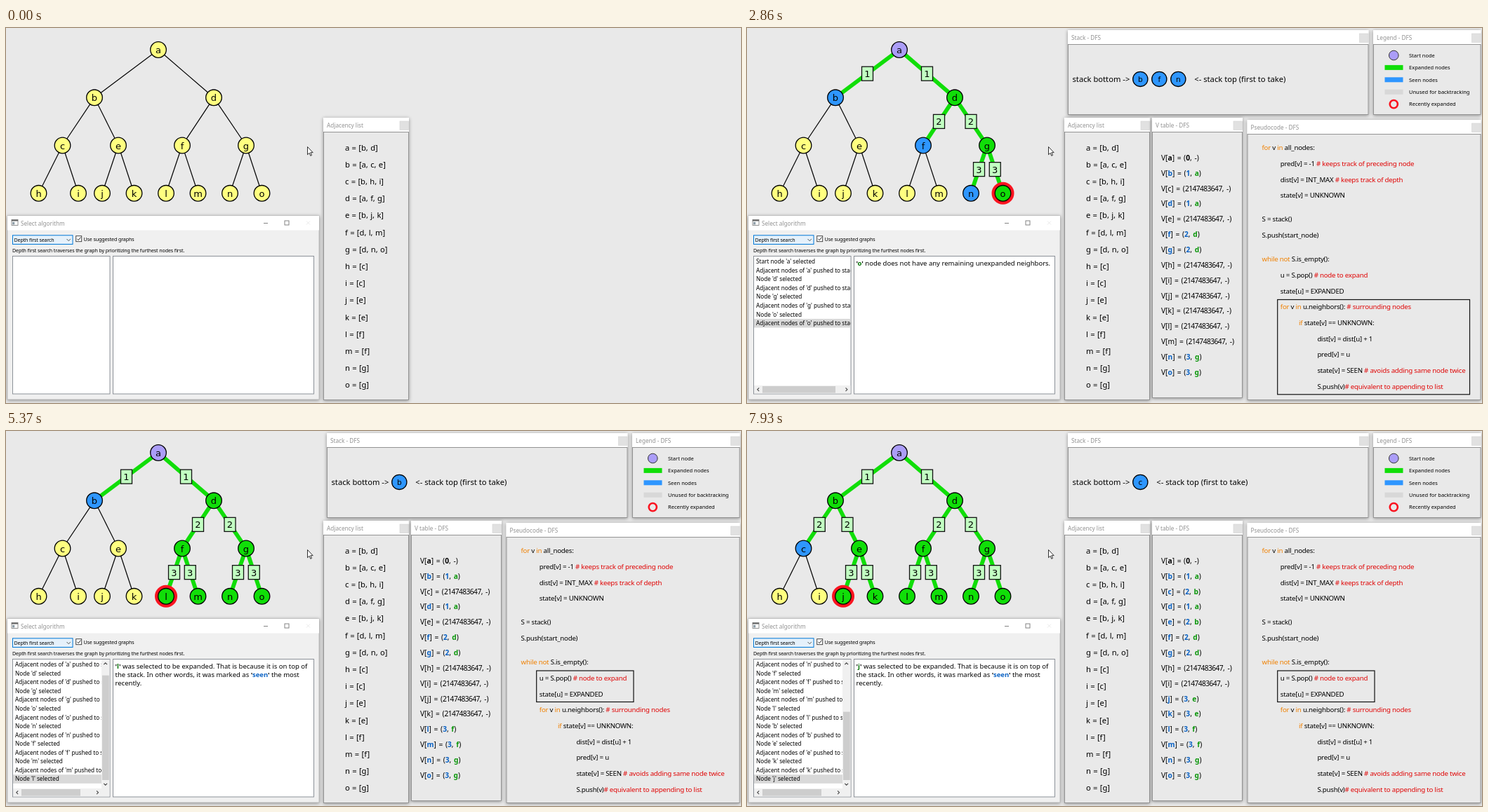
Animation, 1047 px wide and 535 px high, one loop 8 s. Source, as an HTML page:

```html
<!DOCTYPE html>
<html lang="en">
<head>
<meta charset="utf-8">
<title>Depth first search</title>
<style>
html, body { margin: 0; width: 100%; height: 100%; overflow: hidden; background: #e9e9e9; }
svg { display: block; }
text { font-family: "Noto Sans", sans-serif; fill: #000; white-space: pre; }
.title { font-size: 8.2px; fill: #929292; }
.ui { font-size: 7.1px; letter-spacing: -.12px; }
.log { font-size: 8.2px; }
.body { font-size: 9.5px; }
.adj { font-size: 11.2px; word-spacing: .4px; }
.row { font-size: 10.2px; word-spacing: 1px; }
.digits { letter-spacing: -.55px; }
.code { font-size: 9.7px; letter-spacing: -.23px; }
.legend { font-size: 7.5px; }
.stack { font-size: 11.2px; }
.node, .item { font-family: "DejaVu Sans", sans-serif; text-anchor: middle; }
.node { font-size: 13px; }
.item { font-size: 10.5px; }
.b { font-weight: bold; }
.blue { font-weight: bold; fill: #0a62c4; }
.green { font-weight: bold; fill: #0a960a; }
.dark { font-weight: bold; fill: #007000; }
.key { fill: #f08000; }
.note { fill: #e00606; }
.win { filter: drop-shadow(0 1px 2.5px rgba(0, 0, 0, .4)); }
</style>
</head>
<body>
<svg id="stage" width="1047" height="535" viewBox="0 0 1047 535">
  <g id="graph"></g>
  <g id="base"></g>
  <g id="panel"></g>
  <g id="extra">
    <g id="frames"></g>
    <g id="live"></g>
    <g id="focus"></g>
  </g>
  <path d="M429.5 169.5v11.2l2.6-2.4 1.7 4 1.7-.8-1.7-3.8h3.4z" fill="#fff" stroke="#000" stroke-width=".8"/>
</svg>
<script>
const LOOP = 8000;
const YELLOW = '#ffff80', PURPLE = '#ab9df8', GREEN = '#10de08', BLUE = '#2e96ff', RED = '#fa1420', ORANGE = '#ffb108';
const names = [...'abcdefghijklmno'];
const kids = { a: 'bd', b: 'ce', c: 'hi', d: 'fg', e: 'jk', f: 'lm', g: 'no' };
const levels = [31, 99.3, 167.5, 235.8];
const xs = [217, 126, 80.5, 296, 160, 251, 342, 46.5, 103, 137, 182.5, 228, 273.5, 319, 364.5];
const parent = {}, depth = { a: 0 }, pos = {};
const walk = u => [...(kids[u] || '')].forEach(v => {
  parent[v] = u;
  depth[v] = depth[u] + 1;
  walk(v);
});
walk('a');
names.forEach((n, i) => pos[n] = [xs[i], levels[depth[n]]]);

const $ = id => document.getElementById(id);
const text = (x, y, cls, s) => `<text x="${x}" y="${y}" class="${cls}">${s}</text>`;
const span = (cls, s) => `<tspan class="${cls}">${s}</tspan>`;
const rect = (x, y, w, h, fill, stroke = 'none', sw = 1) =>
  `<rect x="${x}" y="${y}" width="${w}" height="${h}" fill="${fill}" stroke="${stroke}" stroke-width="${sw}"/>`;
const circle = (x, y, r, fill, stroke = 'none', sw = 1.4) =>
  `<circle cx="${x}" cy="${y}" r="${r}" fill="${fill}" stroke="${stroke}" stroke-width="${sw}"/>`;
const path = (d, stroke, sw) => `<path d="${d}" fill="none" stroke="${stroke}" stroke-width="${sw}"/>`;
const quote = (cls, n) => `${span('b', "'")}${span(cls, n)}${span('b', "'")}`;

// Run the search once and keep a snapshot of every step
const steps = [];
const stack = ['a'], seen = new Set('a'), done = new Set();
function snap(log, recent, fresh, lines) {
  steps.push({ log, recent, fresh, lines, stack: [...stack], seen: new Set(seen), done: new Set(done) });
}
while (stack.length) {
  const u = stack.pop(), next = [...(kids[u] || '')];
  done.add(u);
  snap(u == 'a' ? "Start node 'a' selected" : `Node '${u}' selected`, u, [], u == 'a'
    ? [`${quote('dark', u)} was selected as the start node.`]
    : [`${quote('dark', u)} was selected to be expanded. That is because it is on top of`,
       `the stack. In other words, it was marked as ${quote('blue', 'seen')} the most`, 'recently.']);
  next.forEach(v => { stack.push(v); seen.add(v); });
  snap(`Adjacent nodes of '${u}' pushed to stack`, u, next, next.length
    ? [`Adjacent nodes of ${quote('dark', u)} were pushed to the stack and`,
       `marked as ${quote('blue', 'seen')}: ${next.map(v => quote('blue', v)).join(', ')}.`]
    : [`${quote('dark', u)} node does not have any remaining unexpanded neighbors.`]);
}

// Graph and tables change first, the log sometimes a moment later
const starts = [540, 860, 1100, 1500, 1800, 2180, 2550, 2860, 3180, 3570, 3870, 4190,
  4590, 4960, 5290, 5600, 5980, 6310, 6610, 6990, 7310, 7620, 7930];
const lag = { 540: 170, 1100: 80, 1500: 60, 3180: 80, 4590: 60, 5290: 80, 6610: 70 };

function toolWindow(x, y, w, h, title) {
  return `<g class="win">${rect(x, y, w, h, '#e9e9e9')}</g>` + rect(x, y, w, 20.5, '#fff') +
    rect(x + .5, y + 20.5, w - 1, h - 21, '#e9e9e9', '#8a8a8a', .9) +
    rect(x + w - 13, y + 5, 12.5, 12.5, '#e1e1e1', '#d2d2d2', .6) + text(x + 5, y + 13.7, 'title', title);
}

function drawBase() {
  const near = n => (parent[n] || '') + (kids[n] || '');
  let s = `<g class="win">${rect(2, 268, 444, 262, '#f0f0f0', '#b4b4b4', .8)}</g>` + rect(2, 268, 444, 20.5, '#fff') +
    rect(8, 273.5, 9, 8, '#fff', '#777', .8) + rect(8, 273.5, 9, 2, '#666') + rect(9.2, 276.8, 3, 3.6, '#8a9aa5') +
    text(21, 281.5, 'title', 'Select algorithm') +
    path('M367 278.5h6', '#777', .9) + rect(397, 275, 6, 6, 'none', '#777', .9) +
    path('M428 275.5l5 5m0-5l-5 5', '#e4e4e4', .8) +
    rect(9.5, 295.8, 85.5, 12.7, '#e5f1fb', '#0078d7', 1) + text(11.5, 304.9, 'ui', 'Depth first search') +
    path('M86.5 301l2.7 2.7 2.7-2.7', '#444', .9) +
    rect(99.7, 296.7, 8, 8, '#fff', '#333', .9) + path('M101.4 300.8l1.8 1.9 3.2-4.2', '#222', 1) +
    text(110.5, 303.6, 'ui', 'Use suggested graphs') +
    text(9, 319.7, 'ui', 'Depth first search traverses the graph by prioritizing the furthest nodes first.') +
    rect(9.5, 325.5, 138.5, 196.5, '#fff', '#82878f', .9) + rect(152.5, 325.5, 286, 196.5, '#fff', '#82878f', .9) +
    toolWindow(452, 128, 122, 403, 'Adjacency list');
  names.forEach((n, i) => s += text(483, 174.5 + i * 24.21, 'adj', `${n} = [${[...near(n)].join(', ')}]`));
  $('base').innerHTML = s;
}

const code = [
  [0, 0, 'for v in all_nodes:'],
  [1, 1, 'pred[v] = -1 # keeps track of preceding node'],
  [2, 1, 'dist[v] = INT_MAX # keeps track of depth'],
  [3, 1, 'state[v] = UNKNOWN'],
  [4.5, 0, 'S = stack()'],
  [5.5, 0, 'S.push(start_node)'],
  [7, 0, 'while not S.is_empty():'],
  [8, 1, 'u = S.pop() # node to expand'],
  [9, 1, 'state[u] = EXPANDED'],
  [10, 1, 'for v in u.neighbors(): # surrounding nodes'],
  [11, 2, 'if state[v] == UNKNOWN:'],
  [12, 3, 'dist[v] = dist[u] + 1'],
  [13, 3, 'pred[v] = u'],
  [14, 3, 'state[v] = SEEN # avoids adding same node twice'],
  [15, 3, 'S.push(v)# equivalent to appending to list']
];

function drawFrames() {
  let s = toolWindow(457, 3, 428.5, 121, 'Stack - DFS') + toolWindow(892, 3, 153.5, 121, 'Legend - DFS') +
    toolWindow(577, 128, 129, 400, 'V table - DFS') + toolWindow(712.5, 131, 333, 400, 'Pseudocode - DFS') +
    text(463.5, 76.8, 'stack', 'stack bottom -&gt;');
  ['Start node', 'Expanded nodes', 'Seen nodes', 'Unused for backtracking', 'Recently expanded'].forEach((label, i) => {
    const y = 39 + i * 17.4, bar = [, GREEN, BLUE, '#d8d8d8'][i];
    s += text(943, y + 2.8, 'legend', label) + (bar ? rect(908.5, y - 3.5, 26, 7, bar)
      : i ? circle(921.3, y, 5.6, 'none', RED, 2.6) : circle(921.3, y, 6.8, PURPLE, '#333', 1));
  });
  for (const [row, indent, line] of code) {
    const [head, note] = line.split('#');
    s += text(733.5 + indent * 26.3, 174.3 + row * 22.7, 'code',
      head.replace(/\b(for|in|while not|if)\b/g, span('key', '$1')) + (note ? span('note', '#' + note) : ''));
  }
  $('frames').innerHTML = s;
}

function drawGraph(st) {
  const { seen, done, fresh, recent } = st || { seen: new Set(), done: new Set(), fresh: [] };
  let lines = '', rings = '', tags = '', nodes = '';
  for (const n of names) {
    const [x, y] = pos[n], hot = fresh.includes(n);
    if (parent[n]) {
      const [px, py] = pos[parent[n]], d = `M${px} ${py}L${x} ${y}`, mx = (x + px) / 2, my = (y + py) / 2;
      if (hot) lines += path(d, ORANGE, 10);
      lines += seen.has(n) ? path(d, GREEN, 5.8) : path(d, '#000', 1.2);
      if (seen.has(n))
        tags += rect(mx - 8, my - 10, 16, 20, '#c2ffc2', '#111', 1.3) + text(mx, my + 5, 'node', depth[n]);
    }
    if (hot || n == recent) rings += circle(x, y, 16, hot ? ORANGE : RED);
    const fill = !seen.has(n) ? YELLOW : n == 'a' ? PURPLE : done.has(n) ? GREEN : BLUE;
    nodes += circle(x, y, 11.3, fill, '#000', 1.3) + text(x, y + 5, 'node', n);
  }
  $('graph').innerHTML = lines + rings + tags + nodes;
}

function drawTables(st) {
  if (!st) return $('live').innerHTML = '';
  const n = st.stack.length;
  let s = text(556.3 + n * 27, 76.8, 'stack', '&lt;- stack top (first to take)');
  st.stack.forEach((v, i) => {
    const x = 560.3 + i * 27;
    if (st.fresh.includes(v)) s += rect(x - 13.5, 59.4, 27, 27, 'none', ORANGE, 2.3);
    s += circle(x, 72.9, 10.6, BLUE, '#000', 1.3) + text(x, 77, 'item', v);
  });
  names.forEach((v, i) => {
    const y = 185 + i * 21.86, known = st.seen.has(v), c = v == 'a' ? 'b' : 'blue';
    s += text(590, y + 3.8, 'row', `V[${known ? span(c, v) : v}] = (` +
      (known ? span(c, depth[v]) : span('digits', 2 ** 31 - 1)) + ', ' +
      (known && parent[v] ? span('green', parent[v]) : '-') + ')');
    if (st.fresh.includes(v)) s += rect(586.5, y - 9.2, 62, 18.4, 'none', ORANGE, 2.3);
  });
  $('live').innerHTML = s;
}

function chevron(x, y, dx, dy) {
  return path(`M${x - dx - 2 * dy} ${y - dy - 2 * dx}L${x + dx} ${y + dy}L${x - dx + 2 * dy} ${y - dy + 2 * dx}`, '#444', 1.1);
}

function drawPanel(k) {
  if (k < 0) return $('panel').innerHTML = $('focus').innerHTML = '';
  const count = k + 1, fit = 14, pitch = 12.56, skip = Math.max(0, count - fit);
  const right = skip ? 136 : 147.4;
  let rows = '';
  for (let i = skip; i < count; i++) {
    const y = (i - skip) * pitch;
    if (i == k) rows += rect(0, y + 1, 138, pitch, '#d9d9d9');
    rows += text(3, y + 10.2, 'log', steps[i].log);
  }
  let s = `<svg x="10" y="326" width="${right - 10}" height="183.5">${rows}</svg>`;
  if (k) s += rect(10, 510, 137.4, 11.4, '#f0f0f0') + rect(22, 511, skip ? 84 : 104, 9.6, '#cdcdcd') +
    chevron(16, 515.8, -1.2, 0) + chevron(right - 5.7, 515.8, 1.2, 0);
  if (skip) s += rect(136, 326, 11.4, 184, '#f0f0f0') +
    rect(137, 338 + 160 * skip / count, 9.8, 160 * fit / count, '#cdcdcd') +
    chevron(141.7, 332, 0, -1.2) + chevron(141.7, 504, 0, 1.2);
  steps[k].lines.forEach((line, i) => s += text(155.5, 338.8 + i * 12, 'body', line));
  $('panel').innerHTML = s;
  $('focus').innerHTML = k % 2 ? rect(755.7, 387.5, 273.8, 135.3, 'none', '#111', 1.2)
    : rect(755.7, 342, 138.3, 44.5, 'none', '#111', 1.2);
}

let shownGraph, shownPanel;
function tick() {
  const t = performance.now() % LOOP;
  const g = starts.filter(s => s <= t).length - 1;
  const p = starts.filter(s => s + (lag[s] || 0) <= t).length - 1;
  if (g !== shownGraph) {
    drawGraph(steps[g]);
    drawTables(steps[g]);
    shownGraph = g;
  }
  if (p !== shownPanel) drawPanel(shownPanel = p);
  $('extra').setAttribute('opacity', t < 540 ? 0 : t < 620 ? .5 : 1);
  requestAnimationFrame(tick);
}
drawBase();
drawFrames();
tick();
</script>
</body>
</html>
```
